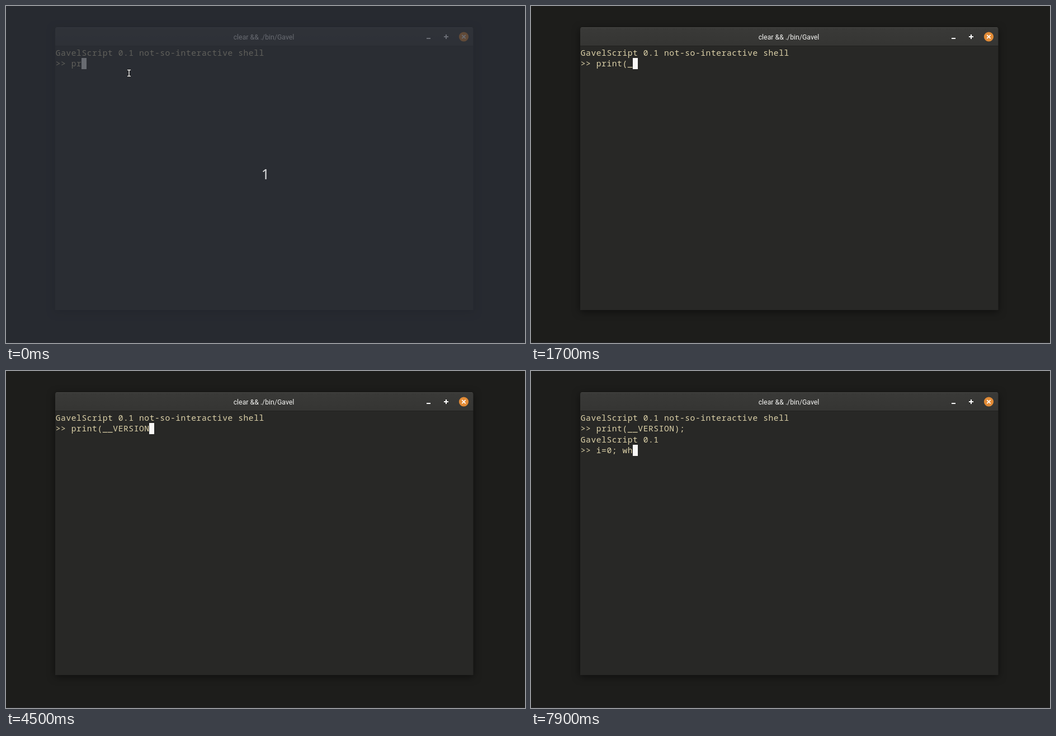
Recreate the animation shown at these times as an HTML page with a canvas. Size 928 px wide and 603 px high, loop 8000 ms.

```html
<!DOCTYPE html>
<html lang="en">
<head>
<meta charset="utf-8">
<title>Terminal session</title>
<style>
  html, body { margin: 0; width: 100%; height: 100%; overflow: hidden; background: #1d1d1b; }
  canvas { display: block; }
</style>
</head>
<body>
<canvas id="stage" width="928" height="603"></canvas>
<script>
const ctx = document.getElementById('stage').getContext('2d');
const LOOP = 8000;
const WIN = { x: 88, y: 38, w: 747.5, h: 506, bar: 33 };
const GRID = { x: 88.5, y: 74, w: 9.325, h: 19.5 };
const BANNER = 'GavelScript 0.1 not-so-interactive shell';
const FIRST = 'print(__VERSION);';
const ENTER_TIME = 5500;

// What stands after the prompt from each time on.
const firstInput = [
  [0, 'pr'], [100, 'pri'], [500, 'print'], [1000, 'print('],
  [1700, 'print(_'], [2000, 'print(__'], [2400, 'print(__V'], [2500, 'print(__VE'],
  [2800, 'print(__VER'], [2900, 'print(__VERS'], [3000, 'print(__VERSI'],
  [3500, 'print(__VERSIPO'], [3700, 'print(__VERSIPON'], [3900, 'print(__VERSIP'],
  [4000, 'print(__VERSI'], [4400, 'print(__VERSIO'], [4500, 'print(__VERSION'],
  [5200, 'print(__VERSION)'], [5400, FIRST]
];
const secondInput = [
  [5500, ''], [6800, 'i'], [7000, 'i='], [7200, 'i=0'], [7400, 'i=0;'],
  [7500, 'i=0; '], [7700, 'i=0; w'], [7900, 'i=0; wh']
];

function typed(steps, t) {
  let text = '';
  for (const [at, value] of steps) if (t >= at) text = value;
  return '>> ' + text;
}

function screenLines(t) {
  if (t < ENTER_TIME) return [BANNER, typed(firstInput, t)];
  return [BANNER, '>> ' + FIRST, 'GavelScript 0.1', typed(secondInput, t)];
}

function rect(color, x, y, w, h) {
  ctx.fillStyle = color;
  ctx.fillRect(x, y, w, h);
}

function label(text, x, y, font, color) {
  ctx.font = font;
  ctx.fillStyle = color;
  ctx.textAlign = 'center';
  ctx.fillText(text, x, y);
}

function segments(color, width, lines) {
  ctx.strokeStyle = color;
  ctx.lineWidth = width;
  ctx.beginPath();
  for (const [x1, y1, x2, y2] of lines) {
    ctx.moveTo(x1, y1);
    ctx.lineTo(x2, y2);
  }
  ctx.stroke();
}

function windowPath() {
  ctx.beginPath();
  ctx.roundRect(WIN.x, WIN.y, WIN.w, WIN.h, [4, 4, 0, 0]);
}

function drawWindow() {
  ctx.save();
  ctx.shadowColor = 'rgba(0,0,0,0.5)';
  ctx.shadowBlur = 14;
  ctx.shadowOffsetY = 3;
  ctx.fillStyle = '#282826';
  windowPath();
  ctx.fill();
  ctx.restore();

  ctx.save();
  windowPath();
  ctx.clip();
  const shade = ctx.createLinearGradient(0, WIN.y, 0, WIN.y + WIN.bar);
  shade.addColorStop(0, '#3a3a38');
  shade.addColorStop(1, '#353533');
  rect(shade, WIN.x, WIN.y, WIN.w, WIN.bar);
  rect('#484846', WIN.x, WIN.y, WIN.w, 1);
  rect('#21211f', WIN.x, WIN.y + WIN.bar, WIN.w, 1);
  ctx.restore();

  label('clear && ./bin/Gavel', 461, 60, '12.3px Roboto, sans-serif', '#f4f4f2');
  rect('#ffffff', 752, 57, 7, 2);
  segments('#ffffff', 2, [[783, 55, 791, 55], [787, 51, 787, 59]]);
  ctx.fillStyle = '#e28b36';
  ctx.beginPath();
  ctx.arc(818.5, 55, 8.6, 0, Math.PI * 2);
  ctx.fill();
  segments('#ffffff', 1.7, [[815.3, 51.8, 821.7, 58.2], [821.7, 51.8, 815.3, 58.2]]);
}

function drawTerminal(lines) {
  lines.forEach((line, row) => {
    const base = Math.round(GRID.y + row * GRID.h + 14.8);
    [...line].forEach((ch, col) => {
      label(ch, GRID.x + (col + 0.5) * GRID.w, base,
        '14.6px "Noto Sans Mono", monospace', '#ddd2a9');
    });
  });
  const row = lines.length - 1;
  const x = Math.round(GRID.x + lines[row].length * GRID.w);
  rect('#f9f8f6', x, Math.floor(GRID.y + row * GRID.h), 9, 20);
}

function drawPointer(x, y) {
  const beam = [
    [x, y - 5, x, y + 5],
    [x - 3, y - 5.5, x + 3, y - 5.5],
    [x - 3, y + 5.5, x + 3, y + 5.5]
  ];
  segments('#111111', 3.4, beam);
  segments('#ffffff', 1.4, beam);
}

function drawCountdown() {
  rect('rgba(43,47,58,0.7)', 0, 0, 928, 603);
  drawPointer(220, 120);
  label('1', 464, 310, '25px "Noto Sans", sans-serif', '#dcddde');
}

function render(t) {
  rect('#1d1d1b', 0, 0, 928, 603);
  rect('#29282b', 0, 602, 928, 1);
  drawWindow();
  drawTerminal(screenLines(t));
  if (t < 100) drawCountdown();
}

const start = performance.now();
function tick() {
  render((performance.now() - start) % LOOP);
  requestAnimationFrame(tick);
}
tick();
</script>
</body>
</html>
```
